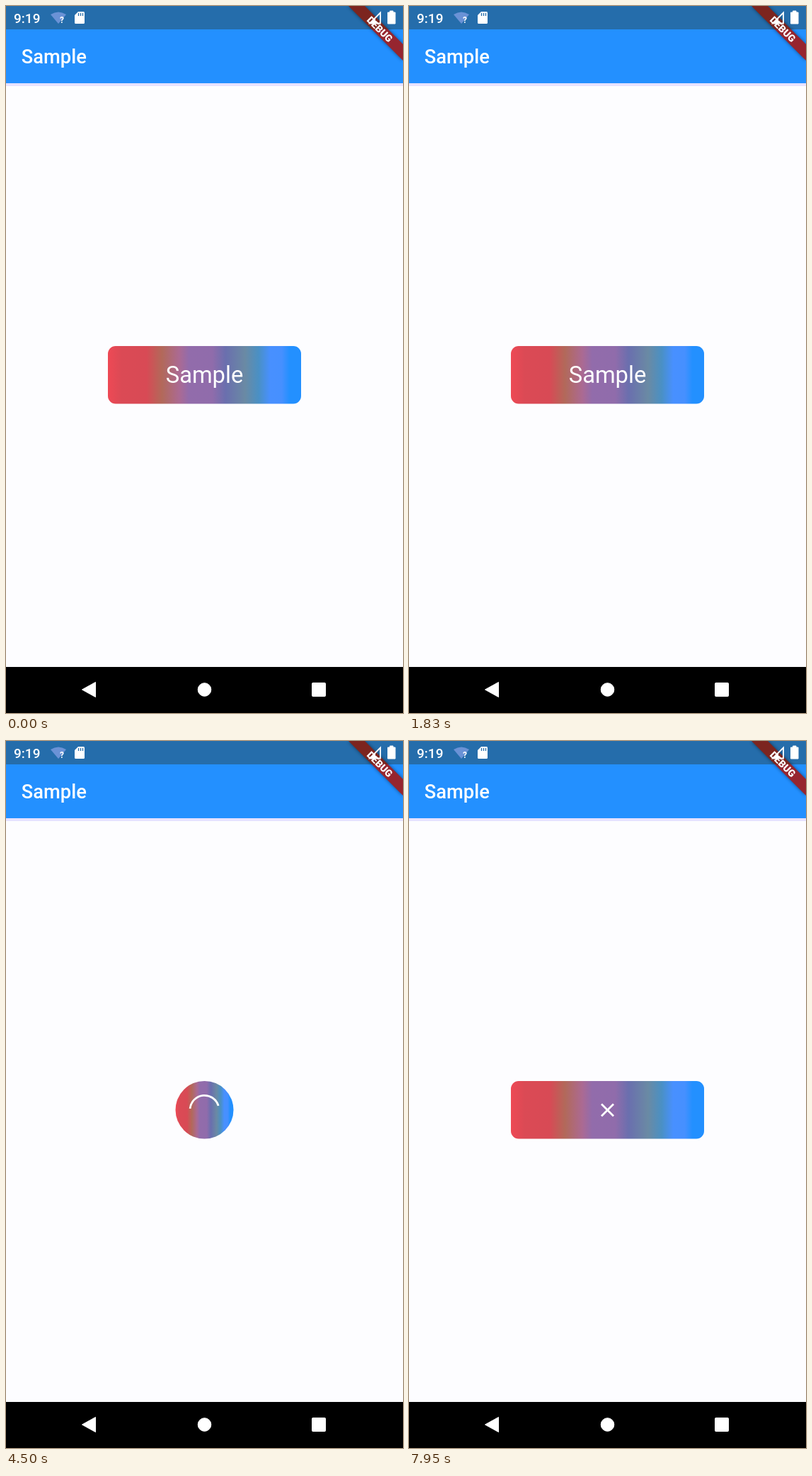
An HTML page for the animation above (8000 ms loop, 561x998 px).

```html
<!DOCTYPE html>
<html lang="en">
<head>
<meta charset="utf-8">
<title>Loading button</title>
<style>
  html, body { margin: 0; width: 100%; height: 100%; overflow: hidden; background: #fdfdff; }
  svg { display: block; width: 561px; height: 998px; }
  text { font-family: Roboto, sans-serif; fill: #fff; }
  .medium { font-weight: 500; }
  .line { fill: none; stroke: #fff; stroke-width: 2.8; }
</style>
</head>
<body>
<svg viewBox="0 0 561 998">
  <defs>
    <linearGradient id="fill">
      <stop offset="0" stop-color="#ee4955"/>
      <stop offset=".07" stop-color="#db4a55"/>
      <stop offset=".2" stop-color="#d84a55"/>
      <stop offset=".28" stop-color="#b2695a"/>
      <stop offset=".37" stop-color="#ab6a93"/>
      <stop offset=".42" stop-color="#926cab"/>
      <stop offset=".54" stop-color="#906cab"/>
      <stop offset=".61" stop-color="#6a6fae"/>
      <stop offset=".71" stop-color="#6a8aa4"/>
      <stop offset=".78" stop-color="#4a90c4"/>
      <stop offset=".84" stop-color="#4890ff"/>
      <stop offset=".9" stop-color="#4690ff"/>
      <stop offset=".94" stop-color="#2390ff"/>
    </linearGradient>
    <linearGradient id="ribbon" gradientUnits="userSpaceOnUse" x1="0" y1="0" x2="0" y2="78">
      <stop offset=".42" stop-color="#7c251f"/>
      <stop offset=".42" stop-color="#96252f"/>
    </linearGradient>
    <filter id="blur"><feGaussianBlur stdDeviation="2.5"/></filter>
  </defs>

  <!-- App bar -->
  <rect width="561" height="998" fill="#fdfdff"/>
  <rect y="109" width="561" height="4" fill="#e6e2ff"/>
  <rect y="32" width="561" height="77" fill="#2390ff"/>
  <rect width="561" height="33" fill="#256dab"/>
  <text class="medium" x="21.8" y="81" font-size="27.3">Sample</text>

  <!-- Debug ribbon -->
  <path d="M484 0H507L561 54V77Z" opacity=".5" filter="url(#blur)"/>
  <path d="M484 0H507L561 54V77Z" fill="url(#ribbon)"/>
  <text transform="translate(528.2 32.8) rotate(45)" y="4.9" text-anchor="middle"
        font-size="13.9" font-weight="900">DEBUG</text>

  <!-- Status icons -->
  <text class="medium" x="11" y="23.5" font-size="19">9:19</text>
  <path d="M63 12Q74 5 85 12L74 25Z" fill="#6a92d6"/>
  <text x="76" y="24" font-size="12" font-weight="700">?</text>
  <path d="M102 8H109.500Q111 8 111 9.500V23.500Q111 25 109.500 25H98.500Q97 25 97 23.500V13Z" fill="#fff"/>
  <path d="M102.500 10v4M105.500 10v4M108.500 10v4" stroke="#256dab" stroke-width="1.300"/>
  <path d="M514 24.500L529 9.500V24.500Z" fill="none" stroke="#fff" stroke-width="1.800"/>
  <path d="M513 25L522 16V25Z" fill="#fff"/>
  <path d="M542.500 7H547V9H550V25H539.500V9H542.500Z" fill="#fff" stroke="#fff" stroke-linejoin="round"/>

  <!-- Button -->
  <rect id="button" y="480" height="81.500" fill="url(#fill)"/>
  <text id="label" x="280.500" y="532" text-anchor="middle" font-size="32.700">Sample</text>
  <path id="spinner" class="line"/>
  <path id="cross" class="line" d="M272 512.500l17 17M289 512.500l-17 17"/>

  <!-- Navigation bar -->
  <rect y="933" width="561" height="65"/>
  <g fill="#fff" stroke="#fff" stroke-linejoin="round">
    <path d="M107.500 965L126.500 954.500V975.500Z"/>
    <circle cx="280.500" cy="965" r="9.300"/>
    <rect x="432.500" y="955.500" width="19" height="19" rx="1"/>
  </g>
</svg>
<script>
const LOOP = 8000, SPEED = 1.057;
const SHRINK_AT = 2567, SPIN_AT = 2996, EXPAND_AT = 5810;
const [button, label, spinner, cross] =
  ["button", "label", "spinner", "cross"].map(id => document.getElementById(id));

const clamp = x => Math.min(1, Math.max(0, x));
const mix = (a, b, k) => a + (b - a) * k;
const progress = (t, start) => clamp((t - start) * SPEED / 1000);

// Cubic Bezier easing with control heights 0 and 1, solved by bisection.
const bezier = (x1, x2) => x => {
  let low = 0, high = 1;
  for (let i = 0; i < 24; i++) {
    const s = (low + high) / 2;
    const value = 3 * x1 * s * (1 - s) ** 2 + 3 * x2 * s * s * (1 - s) + s ** 3;
    if (value < x) low = s; else high = s;
  }
  return low * low * (3 - 2 * low);
};
const easeInOut = bezier(.42, .58);
const fastOutSlowIn = bezier(.4, .2);

function arcPath(t) {
  const time = Math.max(0, t - SPIN_AT) * SPEED;
  const phase = time / 1333 % 1;
  const head = fastOutSlowIn(clamp(phase * 2));
  const tail = fastOutSlowIn(clamp(phase * 2 - 1));
  const turns = -.25 + tail * .75 + time / 2222 + phase * .25;
  const sweep = Math.max(.001, (head - tail) * .75);
  const point = turn => {
    const angle = turn * 2 * Math.PI;
    return `${280.5 + 20.5 * Math.cos(angle)} ${520.8 + 20.5 * Math.sin(angle)}`;
  };
  return `M${point(turns)}A20.5 20.5 0 ${sweep > .5 ? 1 : 0} 1 ${point(turns + sweep)}`;
}

function draw(t) {
  const shrink = progress(t, SHRINK_AT), expand = progress(t, EXPAND_AT);
  const round = easeInOut(shrink) - easeInOut(expand);
  const width = mix(273, 82, round);
  button.setAttribute("x", 280.5 - width / 2);
  button.setAttribute("width", width);
  button.setAttribute("rx", mix(10.9, 40.75, round));

  // Each content fades out before the next one fades in.
  label.style.opacity = clamp(1 - 2 * shrink);
  spinner.style.opacity = Math.min(clamp(2 * shrink - 1), clamp(1 - 2 * expand));
  cross.style.opacity = clamp(2 * expand - 1);
  spinner.setAttribute("d", arcPath(t));
}

function tick() {
  draw(performance.now() % LOOP);
  requestAnimationFrame(tick);
}
tick();
</script>
</body>
</html>
```
